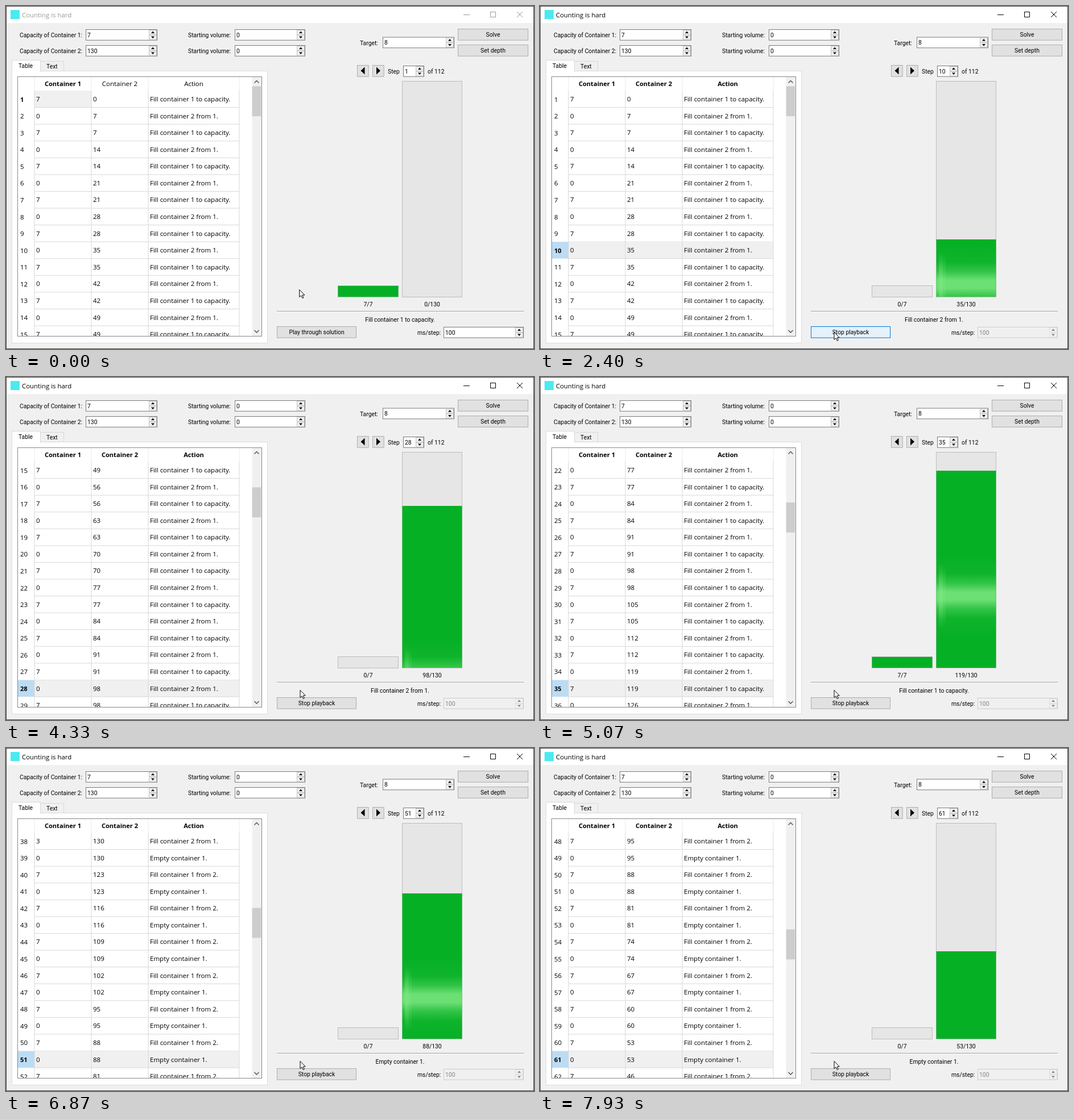
Write an HTML page with a canvas that moves like this. It is 928 px wide and 604 px high and loops after 8000 ms.

```html
<!DOCTYPE html>
<html lang="en">
<head>
<meta charset="utf-8">
<title>Counting is hard</title>
<style>
  html, body { margin: 0; overflow: hidden; background: #f0f0f0; }
  canvas { display: block; }
</style>
</head>
<body>
<canvas id="stage" width="928" height="604"></canvas>
<script>
const ctx = document.getElementById('stage').getContext('2d');
const LOOP = 8000, FPS = 15;
const ACTIVATE = 1330, PLAY = 1370, STEP_MS = 108.5;
const CAP1 = 7, CAP2 = 130;
const UI = '10.35px Roboto, sans-serif';
const TABLE = '11.5px "Open Sans", sans-serif';
const TABLE_BOLD = 'bold 11.1px "Open Sans", sans-serif';
const GREEN = '#06b025';

const clamp = v => Math.max(0, Math.min(1, v));
const ramp = (t, from, to) => clamp((t - from) / (to - from));
const smooth = p => p * p * (3 - 2 * p);
const mix = (a, b, p) => `rgb(${a.map((v, i) => Math.round(v + (b[i] - v) * p))})`;

function fill(x, y, w, h, color) {
  ctx.fillStyle = color;
  ctx.fillRect(x, y, w, h);
}

function box(x, y, w, h, color, border) {
  fill(x, y, w, h, border);
  fill(x + 1, y + 1, w - 2, h - 2, color);
}

// y is the middle of the line
function text(str, x, y, { font = UI, color = '#000', align = 'left' } = {}) {
  ctx.font = font;
  ctx.fillStyle = color;
  ctx.textAlign = align;
  ctx.fillText(str, x, y + 4);
}

function poly(points, color) {
  ctx.beginPath();
  points.forEach(([x, y]) => ctx.lineTo(x, y));
  ctx.closePath();
  ctx.fillStyle = color;
  ctx.fill();
}

function lines(color, width, ...paths) {
  ctx.strokeStyle = color;
  ctx.lineWidth = width;
  ctx.beginPath();
  for (const path of paths) path.forEach(([x, y], i) => i ? ctx.lineTo(x, y) : ctx.moveTo(x, y));
  ctx.stroke();
}

function button(label, x, y, w, color = '#e1e1e1', border = '#adadad') {
  const h = 20.7;
  box(x, y, w, h, color, border);
  text(label, x + w / 2, y + h / 2, { align: 'center' });
}

function spin(value, x, y, w, disabled) {
  const bx = x + w - 15, ink = disabled ? '#838383' : '#000';
  box(x, y, w, 19.7, disabled ? '#f0f0f0' : '#fff', disabled ? '#ccc' : '#7a7a7a');
  box(bx, y + 1, 14, 9, '#f0f0f0', disabled ? '#ddd' : '#c4c4c4');
  box(bx, y + 9.7, 14, 9, '#f0f0f0', disabled ? '#ddd' : '#c4c4c4');
  const cx = bx + 7;
  poly([[cx - 3, y + 7], [cx + 3, y + 7], [cx, y + 3.5]], ink);
  poly([[cx - 3, y + 12.5], [cx + 3, y + 12.5], [cx, y + 16]], ink);
  text(value, x + 3, y + 9.6, { color: ink });
}

// Solution row: [container 1, container 2, action]
function row(n) {
  const even = n % 2 === 0;
  if (n === 38) return [3, CAP2, 'Fill container 2 from 1.'];
  if (n < 38) return even ? [0, n / 2 * 7, 'Fill container 2 from 1.']
                          : [7, (n - 1) / 2 * 7, 'Fill container 1 to capacity.'];
  const left = CAP2 - 7 * Math.floor((n - 38) / 2);
  return even ? [7, left, 'Fill container 1 from 2.'] : [0, left, 'Empty container 1.'];
}

function drawWindow(active) {
  fill(0, 0, 928, 604, '#f0f0f0');
  fill(0, 0, 928, 30, '#fff');
  const ink = active ? '#000' : '#999';
  fill(8, 7, 16, 16, '#4ceaf0');
  text('Counting is hard', 28, 15.7, { font: '11.4px "Open Sans", sans-serif', color: ink });
  lines(ink, 1, [[804, 15.5], [815, 15.5]],
    [[851, 10.5], [860.5, 10.5], [860.5, 19.5], [851.5, 19.5], [851.5, 10]],
    [[898, 10], [908, 20]], [[908, 10], [898, 20]]);
  ctx.strokeStyle = '#454545';
  ctx.strokeRect(0.5, 0.5, 927, 603);
}

function drawForm(step, playing) {
  [[CAP1, 41], [CAP2, 69]].forEach(([cap, y], i) => {
    text(`Capacity of Container ${i + 1}:`, 24, y + 9.6);
    spin(cap, 140, y, 126);
    text('Starting volume:', 320, y + 9.6);
    spin(0, 402, y, 124);
  });
  text('Target:', 622, 65);
  spin(8, 662, 54.5, 126);
  button('Solve', 794, 40, 124);
  button('Set depth', 794, 68, 124);

  button('', 617, 104, 20.7);
  button('', 644, 104, 20.7);
  poly([[623.5, 114], [630.5, 107.5], [630.5, 120.5]], '#000');
  poly([[658, 114], [651, 107.5], [651, 120.5]], '#000');
  text('Step', 671, 115);
  spin(step, 698, 105, 37);
  text('of 112', 741, 115);

  text('ms/step:', 723, 575);
  spin(100, 769, 565, 141, playing);
}

function drawTable(step, playing) {
  box(10, 114, 450, 480, '#fff', '#dcdcdc');
  box(60, 97, 42, 18, '#f0f0f0', '#d9d9d9');
  box(10, 95, 51, 21, '#fff', '#d9d9d9');
  fill(11, 114, 49, 3, '#fff');
  text('Table', 22, 105);
  text('Text', 71, 106);
  box(20, 124, 430, 458, '#fff', '#828790');

  ['Container 1', 'Container 2', 'Action'].forEach((title, i) =>
    text(title, [100, 200, 330][i], 137, { font: playing || !i ? TABLE_BOLD : TABLE, align: 'center' }));

  const first = Math.max(1, step - 13), pitch = 29.58;
  ctx.save();
  ctx.beginPath();
  ctx.rect(21, 125, 428, 456);
  ctx.clip();
  for (let i = 0; i < 15; i++) {
    const n = first + i, top = 149 + i * pitch, mid = top + 15, current = n === step;
    if (current) {
      fill(50, top, playing ? 360 : 100, pitch, '#f0f0f0');
      if (playing) fill(21, top, 29, pitch, '#bcdcf4');
    }
    fill(50, top + pitch - 0.5, 360, 1, '#d8d8d8');
    text(n, 25, mid + 0.5, { font: current ? TABLE_BOLD : TABLE });
    row(n).forEach((value, k) => text(value, [53, 153, 253][k], mid, { font: TABLE }));
  }
  for (const x of [49.5, 149.5, 249.5, 409.5]) {
    fill(x, 125, 1, 24, '#ececec');
    fill(x, 149, 1, 432, '#d8d8d8');
  }
  fill(432.6, 125, 16.4, 456, '#f0f0f0');
  fill(432.6, 141.3 + (first - 1) * 3.79, 15.5, 52.8, '#cdcdcd');
  lines('#505050', 1.4, [[436.5, 135.5], [440.5, 131.5], [444.5, 135.5]],
    [[436.5, 571], [440.5, 575], [444.5, 571]]);
  ctx.restore();
}

function glow(x, w, center, stops) {
  const g = ctx.createLinearGradient(0, center - 70, 0, center + 70);
  for (const [at, alpha] of stops) {
    g.addColorStop(at, `rgba(130,234,134,${alpha})`);
    g.addColorStop(1 - at, `rgba(130,234,134,${alpha})`);
  }
  fill(x, center - 70, w, 140, g);
}

function drawSheen(t, top) {
  const start = t < 3645 ? 1500 : t < 5390 ? 3645 : 5720;
  const center = 670 - 0.2 * (t - start);
  ctx.save();
  ctx.beginPath();
  ctx.rect(696.5, top, 105, 512 - top);
  ctx.clip();
  glow(696, 106, center, [[0, 0], [0.22, 0.07], [0.34, 0.35], [0.45, 0.82]]);
  glow(701, 7, center, [[0.1, 0], [0.25, 0.25], [0.45, 0.5]]);
  glow(708, 5, center, [[0.1, 0], [0.25, 0.13], [0.45, 0.2]]);
  ctx.restore();
}

// Draws one container and returns the top of its liquid
function container(x, w, top, part) {
  box(x, top, w, 513 - top, '#e6e6e6', '#bcbcbc');
  const level = Math.min(512, Math.round(513.3 - (512.3 - top) * part));
  fill(x + 0.5, level, w - 1, 512 - level, GREEN);
  return level;
}

function drawContainers(t, step) {
  const [v1, v2, action] = row(step);
  container(583, 107, 492, v1 / CAP1);
  const level = container(696, 106, 132, v2 / CAP2);
  if (v2 > 0 && v2 < CAP2) drawSheen(t, level);
  text(`${v1}/${CAP1}`, 636.5, 525, { align: 'center' });
  text(`${v2}/${CAP2}`, 749, 525, { align: 'center' });
  fill(476, 537, 434, 1, '#a0a0a0');
  fill(476, 538, 434, 1, '#fff');
  text(action, 692.5, 551.5, { align: 'center' });
}

function drawPlayButton(t, playing) {
  const hover = ramp(t, 250, 470) - ramp(t, 2700, 3000);
  const pressed = t >= ACTIVATE && !playing;
  const color = pressed ? '#cce4f7' : mix([225, 225, 225], [229, 241, 251], hover);
  const border = pressed ? '#005499' : mix([173, 173, 173], [0, 120, 215], hover);
  button(playing ? 'Stop playback' : 'Play through solution', 476, 564, 140, color, border);
}

function drawCursor(t) {
  const down = smooth(ramp(t, 30, 300)), up = smooth(ramp(t, 2600, 2870));
  ctx.save();
  ctx.translate(515.7 + 1.3 * down, 499.5 + 75 * down - 23 * up);
  const arrow = [[0, 0], [0, 13], [3, 10.3], [5.3, 15], [7.3, 14.2], [5.2, 9.5], [9.3, 9.5], [0, 0]];
  poly(arrow, '#fff');
  lines('#000', 1, arrow);
  ctx.restore();
}

function frame(now) {
  const t = Math.floor(now % LOOP * FPS / 1000 + 0.08) * 1000 / FPS;
  const playing = t >= PLAY;
  const step = playing ? 1 + Math.floor((t - PLAY) / STEP_MS) : 1;
  drawWindow(t >= ACTIVATE);
  drawForm(step, playing);
  drawTable(step, playing);
  drawContainers(t, step);
  drawPlayButton(t, playing);
  drawCursor(t);
  requestAnimationFrame(() => frame(performance.now()));
}
frame(performance.now());
</script>
</body>
</html>
```
